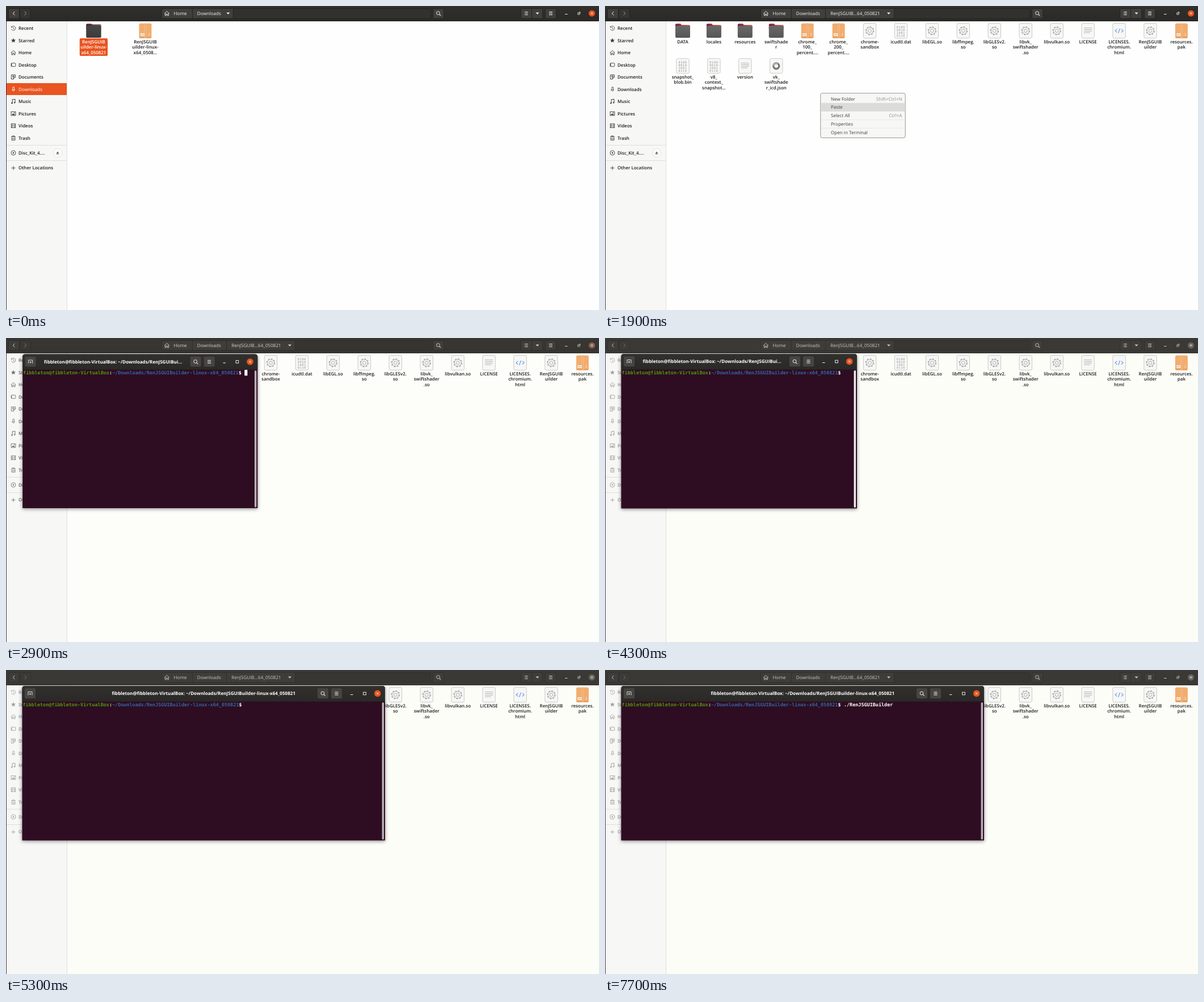
Recreate the animation shown at these times as an HTML page. Size 1045x536 px, loop 8 s.

```html
<!DOCTYPE html>
<html lang="en">
<head>
<meta charset="utf-8">
<title>File manager and terminal</title>
<style>
html, body { margin: 0; width: 100%; height: 100%; overflow: hidden; background: #fff; }
svg { display: block; width: 100%; height: 100%; }
text { font: 500 8.1px "Open Sans", "Noto Sans", sans-serif; white-space: pre; text-rendering: geometricPrecision; }
.strong text { font-weight: 600; font-size: 7.95px; }
.title { font-weight: 700; }
.mono { font: 700 8.445px "DejaVu Sans Mono", "Liberation Mono", monospace; }
.strong .bits { font: 400 5px "DejaVu Sans Mono", monospace; }
</style>
</head>
<body>
<svg id="stage" viewBox="0 0 1045 536">
<defs>
  <linearGradient id="tab"><stop stop-color="#6b2440"/><stop offset="1" stop-color="#d64f30"/></linearGradient>
  <linearGradient id="bar" x2="0" y2="1"><stop stop-color="#31302d"/><stop offset="1" stop-color="#2a2927"/></linearGradient>
  <linearGradient id="dark" x2="0" y2="1"><stop stop-color="#6a6a6a"/><stop offset="1" stop-color="#555"/></linearGradient>
  <pattern id="dots" width="2" height="2" patternUnits="userSpaceOnUse"><rect width="2" height="2" fill="#222" opacity=".6"/><rect width="1" height="1" fill="#222"/></pattern>
  <clipPath id="reveal"><rect id="revealBox" x="328" y="0" width="182" height="27"/></clipPath>
  <filter id="soft" x="-10%" y="-10%" width="120%" height="125%"><feDropShadow dx="0" dy="1.5" stdDeviation="3" flood-opacity=".45"/></filter>
</defs>
</svg>
<script>
const USER = 'fibbleton';
const HOST = `${USER}@${USER}-VirtualBox`;
const DIR = '~/Downloads/RenJSGUIBuilder-linux-x64_050821';
const TITLE = `${HOST}: ${DIR}`;
const CMD = './RenJSGUIBuilder';
const CELL = 5.084, LEFT = 28.5, ORANGE = '#e95420', INK = '#1c1c1c';

const stage = document.getElementById('stage');
const $ = id => document.getElementById(id);
const text = (x, y, s, fill, more = '') => `<text x="${x}" y="${y}" fill="${fill}" ${more}>${s}</text>`;
const mid = (x, y, s, fill, more = '') => text(x, y, s, fill, 'text-anchor="middle" ' + more);
const rect = (x, y, w, h, fill, more = '') => `<rect x="${x}" y="${y}" width="${w}" height="${h}" fill="${fill}" ${more}/>`;
const line = (d, stroke, w = 1, more = '') => `<path d="${d}" fill="none" stroke="${stroke}" stroke-width="${w}" ${more}/>`;
const fill = (d, color) => `<path d="${d}" fill="${color}"/>`;
const disc = (x, y, r, color, more = '') => `<circle cx="${x}" cy="${y}" r="${r}" fill="${color}" ${more}/>`;
const group = (id, body, more = '') => `<g id="${id}" ${more}>${body}</g>`;
const at = (x, y, body) => `<g transform="translate(${x} ${y})">${body}</g>`;

// Small symbols, each centred on its own origin
const lens = c => line('M1.9 1.9L4 4', c, 1.1) + disc(-.5, -.5, 2.9, 'none', `stroke="${c}"`);
const burger = c => line('M-3 -2.5H3M-3 0H3M-3 2.5H3', c);
const cross = c => line('M-1.9 -1.9L1.9 1.9M1.9 -1.9L-1.9 1.9', c, .9);
const caret = c => fill('M-3 -1.4H3L0 1.8Z', c);
const house = c => line('M-4.3 .3L0 -3.7L4.3 .3M-3 -.6V3.8H-1V1H1V3.8H3V-.6', c, .9);

const glyphs = {
  recent: c => line('M-3.2 -2A3.8 3.8 0 1 1 -3.6 1.2M-3.6 -3.5V-1.6H-1.8M0 -2V.4L1.8 1.6', c, .8),
  star: c => fill('M0 -4.2L1.2 -1.3L4.2 -1.2L1.9 .7L2.7 3.8L0 2.1L-2.7 3.8L-1.9 .7L-4.2 -1.2L-1.2 -1.3Z', c),
  home: house,
  desktop: c => rect(-3.8, -3, 7.6, 6, 'none', `rx="1" stroke="${c}" stroke-width=".9"`) + line('M-3.2 -2.5V2.5', c, 1.3),
  documents: c => line('M3.6 0V-3.8H-3.6V3.8H0L3.6 0H0V3.8M-2 -2H2M-2 -.3H1', c, .9),
  downloads: c => line('M-1 1V-3.7H1.5V1M-2.6 1H2.8L0 3.7Z', c, .8),
  music: c => line('M-1.8 3V-3.4L3 -3.9V2', c, 1) + disc(-2.6, 3, 1.2, c) + disc(2.1, 2.2, 1.2, c),
  pictures: c => rect(-3.9, -3.3, 7.8, 6.6, 'none', `stroke="${c}" stroke-width=".9"`) + fill('M-3 2.5L-.7 -.5L.6 1L1.5 .3L3 2.5Z', c) + disc(1.6, -1.4, .9, c),
  videos: c => rect(-3.7, -3.4, 7.4, 6.8, 'none', `stroke="${c}" stroke-width=".9"`) + line('M-2 -3V3M2 -3V3M-2 0H2', c, .8),
  trash: c => line('M-4 -2.2H4M-1.5 -2.2V-3.8H1.5V-2.2M-3 -1V3.8H3V-1M-1 -.5V2.5M1.2 -.5V2.5', c, .9),
  drive: c => disc(0, 0, 4, 'none', `stroke="${c}" stroke-width=".9"`) + disc(0, 0, 1.3, c),
  plus: c => line('M-3.5 0H3.5M0 -3.5V3.5', c, .9)
};

const places = ['Recent', 'Starred', 'Home', 'Desktop', 'Documents', 'Downloads', 'Music', 'Pictures', 'Videos', 'Trash'];
const marks = ['recent', 'star', 'home', 'desktop', 'documents', 'downloads', 'music', 'pictures', 'videos', 'trash'];
const place = (y, label, mark, color, ink = color) => at(13, y, glyphs[mark](color)) + text(22, y + 2.8, label, ink);

function sidebar() {
  const c = '#3a3a3a';
  const rows = places.map((name, i) => place(39.2 + i * 21.5, name, marks[i], c, INK)).join('');
  return rect(0, 27, 107, 509, '#f7f7f6') + line('M107.5 27V536M1 245.5H107M1 272.5H107', '#dfdfdd') +
    group('places', rows + place(259, 'Disc_Kit_4....', 'drive', c, INK) + place(285.6, 'Other Locations', 'plus', c, INK), 'class="strong"') +
    disc(91, 259, 7.5, '#fcfcfc', 'stroke="#ddd" stroke-width=".8"') +
    at(91, 259, group('eject', fill('M-2.3 .8L0 -2.6L2.3 .8ZM-2.3 1.6H2.3V2.6H-2.3Z', '#555'))) +
    group('chosen', rect(1, 136, 106, 21, ORANGE) + place(146.7, 'Downloads', 'downloads', '#fff')) +
    rect(0, 27, 1, 509, '#4b3542');
}

function header(id, p) {
  const btn = (x, w, c = p.btn) => rect(x + .5, 4.5, w, 17.5, c, `rx="2" stroke="${p.edge}"`);
  const crumb = (x, w, label, tx) => btn(x, w) + text(tx, 15.8, label, p.fg);
  return group(id,
    rect(0, 0, 1045, 27, p.bg) + line('M0 26.5H1045', p.edge) +
    btn(24, 19, p.idle) + btn(4, 19) +
    at(14, 13, line('M1.3 -3.3L-1.6 0L1.3 3.3', p.fg)) + at(34, 13, line('M-1.3 -3.3L1.6 0L-1.3 3.3', p.faint)) +
    btn(274, 474, p.entry) +
    `<g class="short">${crumb(328, 72, 'Downloads', 336.8)}${at(391.5, 13, caret(p.fg))}</g>` +
    `<g class="long" clip-path="url(#reveal)">${crumb(388, 121, 'RenJSGUIB…64_050821', 397.3)}${at(500, 13, caret(p.fg))}${crumb(328, 60, 'Downloads', 336.8)}</g>` +
    crumb(274, 54, 'Home', 295.6) + at(283.5, 13, house(p.fg)) +
    btn(752, 19) + at(762, 13, lens(p.fg)) +
    btn(907, 19) + btn(926, 19) + btn(950, 19) +
    at(916.5, 13, burger(p.fg) + line('M-1.8 -4V4', p.btn, .8)) + at(936.5, 13, caret(p.fg)) + at(960, 13, burger(p.fg)) +
    line('M985 14.5H989.5', p.fg) + rect(1007.8, 12, 3, 3, 'none', `stroke="${p.fg}" stroke-width=".8"`) +
    line('M1009.5 10.7H1012V13.5', p.fg, .7) +
    disc(1032.5, 13, 5.6, p.close) + at(1032.5, 13, cross('#fff')));
}

const page = rect(-11.2, -13, 22.4, 26, '#f7f7f6', 'rx="2.5" stroke="#c4c4c2" stroke-width=".9"');
const icons = {
  folder: fill('M-13 -10.5Q-13 -12.5 -11 -12.5H-4L-2 -10.3H11Q13 -10.3 13 -8V-3H-13Z', 'url(#tab)') + rect(-13, -8.6, 26, 21, 'url(#dark)', 'rx="2"'),
  pack: rect(-11, -13, 22, 26, '#f2ad6e', 'rx="2.5"') + rect(-10.5, 11, 21, 1.9, '#de9a5c', 'rx="1"') +
    rect(-1.6, -13, 3.2, 26, '#f6c08c') + line('M0 -13V13', '#dc9858', .8) +
    rect(-8.5, 4.5, 7, 4.5, '#fff4e8') + line('M-7.5 6.8H-2.5', '#c08a55', .8) + line('M6.7 4V9', '#fbd6ae', 1.2),
  gear: page + disc(0, 0, 7, 'none', 'stroke="#a3a3a1" stroke-width="1.5" stroke-dasharray="2.75 2.75"') +
    disc(0, 0, 6, '#f7f7f6', 'stroke="#a3a3a1" stroke-width=".9"') + disc(0, 0, 2.9, 'none', 'stroke="#a3a3a1" stroke-width=".9"'),
  bits: page + ['0100', '0010', '1001', '0110'].map((s, i) => mid(0, -5 + i * 5, s, '#8c8c8c', 'class="bits" letter-spacing=".8"')).join(''),
  doc: page + line('M-7 -5H7M-7 -2.2H7M-7 .6H7M-7 3.4H4', '#b4b4b2', 1),
  html: page + line('M-3.8 -3L-7 0L-3.8 3M3.8 -3L7 0L3.8 3M1.4 -4L-1.4 4', '#5c97e6', 1.1),
  ring: page + disc(0, 0, 5, 'none', 'stroke="#777" stroke-width="3.4"') + line('M-5 0A5 5 0 0 1 3 -4', '#aaa', 3.4)
};
const file = (x, y, kind, label, color = INK) => at(x, y, icons[kind]) +
  label.split('|').map((s, i) => mid(x, y + 22 + i * 9.7, s, color)).join('');

const files = [
  'folder:DATA', 'folder:locales', 'folder:resources', 'folder:swiftshade|r',
  'pack:chrome_|100_|percent.…', 'pack:chrome_|200_|percent.…', 'gear:chrome-|sandbox', 'bits:icudtl.dat',
  'gear:libEGL.so', 'gear:libffmpeg.|so', 'gear:libGLESv2.|so', 'gear:libvk_|swiftshader|.so', 'gear:libvulkan.so',
  'doc:LICENSE', 'html:LICENSES.|chromium.|html', 'gear:RenJSGUIB|uilder', 'pack:resources.|pak',
  'bits:snapshot_|blob.bin', 'bits:v8_|context_|snapshot…', 'doc:version', 'ring:vk_|swiftshade|r_icd.json'
];
const listing = files.map((f, i) => {
  const [kind, label] = f.split(':');
  return file(137 + i % 17 * 54.93, i < 17 ? 43.7 : 105.7, kind, label);
}).join('');

const downloads = rect(129.8, 57, 49.4, 31, ORANGE, 'rx="2"') +
  file(154.4, 43.7, 'folder', 'RenJSGUIB|uilder-linux-|x64_050821', '#fff') +
  rect(141, 32, 27, 24, 'url(#dots)', 'rx="2" opacity=".7"') +
  file(245.5, 43.7, 'pack', 'RenJSGUIB|uilder-linux-|x64_0508…');

const menuItems = [['New Folder', 'Shift+Ctrl+N'], ['Paste', ''], ['Select All', 'Ctrl+A'], ['Properties', ''], ['Open in Terminal', '']];
const menu = rect(379.8, 153.8, 149.4, 78.6, '#f7f7f6', 'rx="3" stroke="#949492"') +
  line('M381 171.2H528M381 200.7H528M381 215.3H528', '#e3e3e1', .8) +
  rect(380.5, 0, 148, 14.7, '#dbdbd9', 'id="hover"') +
  menuItems.map(([name, key], i) => text(398, 166.7 + i * 14.7, name, '#3d3d3d') +
    text(523.5, 166.7 + i * 14.7, key, '#8f8f8d', 'text-anchor="end"')).join('');

const col = n => 29.5 + n * CELL;
const termBtn = x => rect(x, 32.2, 19, 18, '#474541', 'rx="2"');
const terminal =
  `<g filter="url(#soft)"><path id="frame" fill="#2e0a22"/></g><path id="cap" fill="url(#bar)"/>` +
  termBtn(33) + at(42.5, 41.5, line('M-3.5 3V-3H3.5V3M-1.6 .8H1.6M0 -.8V2.4', '#eee', .9)) +
  mid(0, 44.3, '', '#fff', 'id="title" class="title"') +
  group('right', termBtn(-119) + termBtn(-95) + at(-109.5, 41.5, lens('#eee')) + at(-85.5, 41.5, burger('#eee')) +
    line('M-61 43.5H-56.5', '#fff') + rect(-38.3, 39.2, 4.6, 4.6, 'none', 'stroke="#fff" stroke-width=".9"') +
    disc(-13.3, 41.4, 5.8, ORANGE) + at(-13.3, 41.4, cross('#fff')) +
    rect(-5.4, 57, 3.4, 242, '#b9b1b5', 'id="thumb" rx="1.7"')) +
  text(col(0), 64, `<tspan fill="#4e9a06">${HOST}</tspan>:<tspan fill="#3465a4">${DIR}</tspan>$`, '#fff', 'class="mono"') +
  text(col(77), 64, CMD, '#fff', 'id="cmd" class="mono"') +
  rect(0, 0, CELL, 10.2, '#fff', 'id="cursor"') +
  group('size', rect(-22.5, 154, 45, 24, '#1e201e', 'rx="5" stroke="#3b443e"') + mid(0, 169, '', '#fff', 'id="cells"'));

const active = { bg: 'url(#bar)', btn: '#413f3c', idle: '#373532', entry: '#33312e', edge: '#252421', fg: '#f4f4f2', faint: '#9b9996', close: ORANGE };
const backdrop = { bg: '#3b3935', btn: '#3f3d39', idle: '#3c3a36', entry: '#383632', edge: '#32302d', fg: '#c9c7c3', faint: '#75736f', close: '#66645f' };

stage.insertAdjacentHTML('beforeend',
  rect(0, 0, 1045, 536, '#fefefe') + rect(0, 0, 1045, 536, '#fcfdf7', 'id="tint"') +
  group('first', downloads, 'class="strong"') + group('second', listing, 'class="strong"') + sidebar() +
  header('lit', active) + header('dim', backdrop) + group('menu', menu) + group('term', terminal));

const show = (el, on) => el.setAttribute('display', on ? 'inline' : 'none');
const set = (id, attrs) => { for (const k in attrs) $(id).setAttribute(k, attrs[k]); };
const within = (t, a, b) => t >= a && t < b;
const clamp = v => Math.max(0, Math.min(1, v));

function drawTerminal(t) {
  const k = clamp((t - 4600) / 500);
  const cols = t < 4700 ? 80.95 : Math.round(81 + 44 * (1 - (1 - k) ** 2.4));
  const edge = LEFT + cols * CELL + 4;
  const centre = (LEFT + edge) / 2;
  const s = 1 - .005 * (1 - clamp((t - 2800) / 300));
  set('term', { transform: `translate(${centre * (1 - s)} ${164 * (1 - s)}) scale(${s})` });
  const top = `M${LEFT} 56V33Q${LEFT} 28 ${LEFT + 5} 28H${edge - 5}Q${edge} 28 ${edge} 33V`;
  set('frame', { d: top + `300.5H${LEFT}Z` });
  set('cap', { d: top + '55.5H' + LEFT + 'Z' });
  set('right', { transform: `translate(${edge} 0)` });
  set('thumb', { fill: within(t, 4300, 4700) ? '#f1eff0' : '#b9b1b5' });

  // The title is cut with dots when the bar is too narrow
  const room = Math.floor((edge - 195) / 328 * TITLE.length);
  const cut = room < TITLE.length;
  $('title').textContent = cut ? TITLE.slice(0, room - 2) + '...' : TITLE;
  set('title', { x: cut ? (64 + edge - 131) / 2 : centre });

  show($('size'), within(t, 4700, 5300));
  set('size', { transform: `translate(${centre + 2.5} 0)` });
  $('cells').textContent = `${Math.floor(cols)} × 24`;

  show($('cmd'), t >= 6000);
  const off = [[3300, 3700], [4300, 4700], [5300, 5700], [6500, 6900], [7700, 8000]];
  show($('cursor'), !off.some(([a, b]) => within(t, a, b)));
  const entered = t >= 7200;
  set('cursor', { x: entered ? col(0) : col(t < 6000 ? 77 : 95), y: entered ? 66 : 55.8 });
}

function draw(ms) {
  const t = Math.floor(ms / 100) * 100;
  const inside = t >= 100;
  show($('first'), !inside);
  show($('second'), inside);
  document.querySelectorAll('.short').forEach(g => show(g, !inside));
  document.querySelectorAll('.long').forEach(g => show(g, inside));
  set('revealBox', { width: 61 + 121 * clamp(t / 400) });
  set('chosen', { opacity: inside ? clamp((400 - t) / 450) : 1 });

  const fade = t < 2900 ? 0 : t < 3000 ? .75 : t < 3100 ? .92 : 1;
  set('tint', { opacity: fade });
  set('dim', { opacity: fade });
  set('places', { opacity: 1 - .55 * fade ** 2 });
  set('eject', { opacity: 1 - .5 * fade });

  show($('menu'), within(t, 1600, 2600));
  set('menu', { opacity: t < 1700 ? .7 : 1 });
  const row = Math.min(4, Math.floor((t - 1900) / 100) + 1);
  show($('hover'), t >= 1900);
  set('hover', { y: 156.5 + row * 14.7 });

  show($('term'), t >= 2900);
  if (t >= 2900) drawTerminal(t);
}

const start = performance.now();
function tick() {
  draw((performance.now() - start) % 8000);
  requestAnimationFrame(tick);
}
tick();
</script>
</body>
</html>
```
